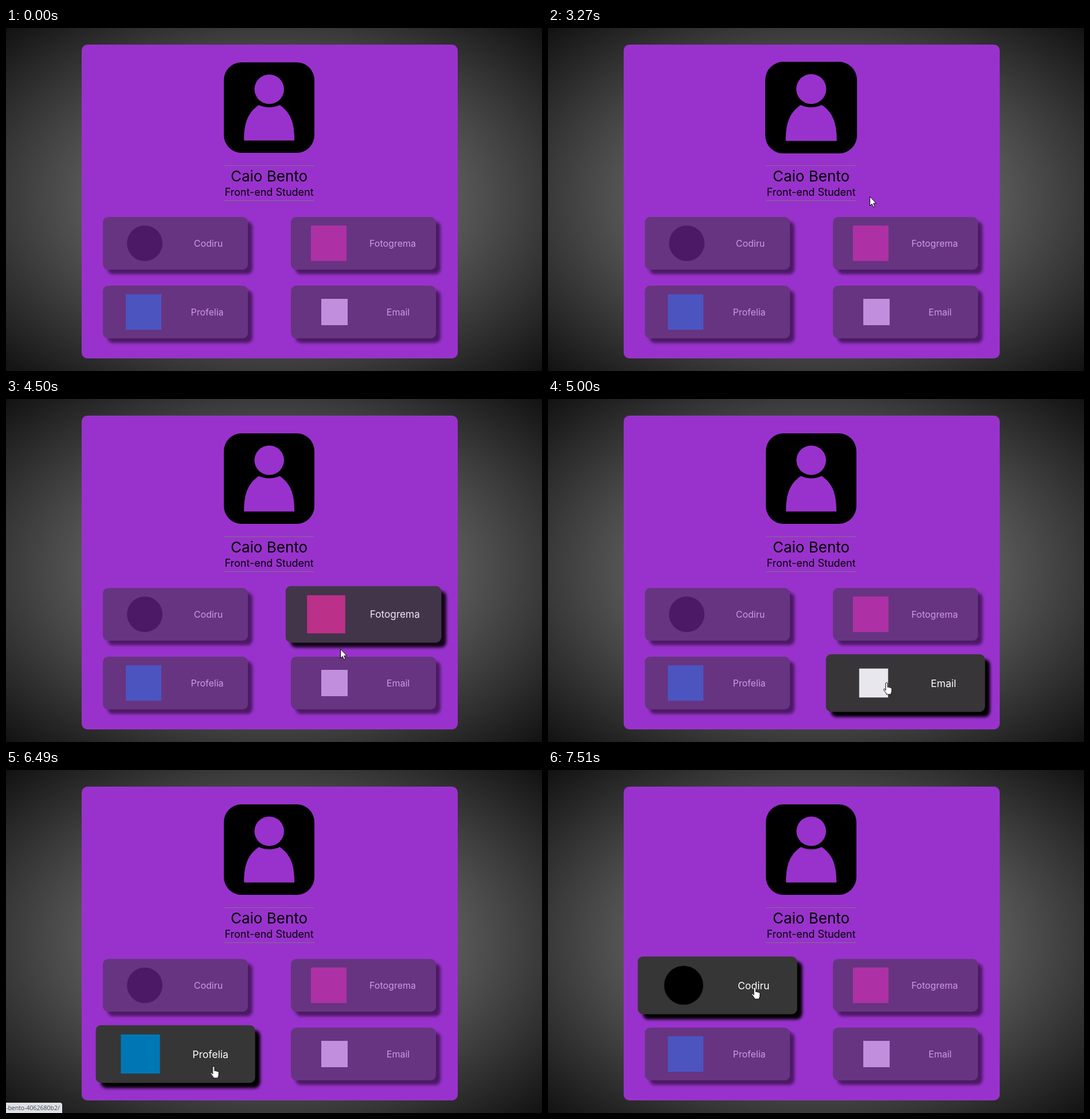
Write an HTML page that moves like this. It is 935 by 599 pixels and loops after 7990 ms.

```html
<!DOCTYPE html>
<html lang="pt">
<head>
<meta charset="utf-8">
<title>Profile card</title>
<style>
  html, body { margin: 0; width: 100%; height: 100%; overflow: hidden; }
  body {
    position: relative;
    background: radial-gradient(#989898, #121212);
    font-family: Inter, "Open Sans", sans-serif;
  }
  body * { position: absolute; box-sizing: border-box; }

  .panel {
    left: 131.5px; top: 28.5px; width: 656px; height: 548px;
    border-radius: 10px; background: #9932cc;
  }

  .hover {
    animation: enter .5s ease var(--on) both, leave .5s ease var(--off) forwards;
    opacity: var(--rest);
  }
  @keyframes enter {
    from { scale: 1; opacity: var(--rest); }
    to { scale: var(--grow); opacity: 1; }
  }
  @keyframes leave {
    from { scale: var(--grow); opacity: 1; }
    to { scale: 1; opacity: var(--rest); }
  }

  .portrait {
    --grow: 1.2; --rest: 1; --on: 1.88s; --off: 2.905s;
    left: 380px; top: 59.5px; width: 158px; height: 158px;
  }

  .title {
    left: 380px; top: 240px; width: 158px; height: 62px;
    border: solid; border-width: 1px 0; border-color: #80728a #a86cc9;
    white-space: nowrap;
  }
  .title span { left: 50%; translate: -50% 0; }
  .name { top: 2px; font-size: 26px; line-height: 32px; }
  .role { top: 34px; font-size: 18px; line-height: 24px; }

  .card {
    --grow: 1.1; --rest: .5;
    left: var(--x); top: var(--y); width: 253px; height: 92px;
    border-radius: 9px; background: #363636; box-shadow: 8px 8px 5px #000;
    color: #fff; font-size: 16px; line-height: 92px;
  }
  .card i {
    left: var(--icon); top: 50%; translate: -50% -50%;
    width: 62px; height: 62px; background: var(--mark);
  }
  .card span { left: var(--label); translate: -50% 0; white-space: nowrap; }

  .code, .work { --x: 169px; }
  .photo, .mail { --x: 497px; }
  .code, .photo { --y: 329.5px; }
  .work, .mail { --y: 449.5px; }

  .code { --on: 6.985s; --off: 9s; --icon: 73px; --label: 184px; --mark: #000; }
  .code i { border-radius: 50%; }
  .photo { --on: 3.44s; --off: 4.41s; --icon: 66px; --label: 177.5px; --mark: #c1307f; }
  .work { --on: 5.88s; --off: 6.92s; --icon: 71px; --label: 182px; --mark: #0077b5; }
  .mail { --on: 4.59s; --off: 5.52s; --icon: 76px; --label: 187px; --mark: #e8eaed; }
  .mail i { width: 46px; height: 46px; }

  .status {
    left: 0; top: 581px; width: 98px; height: 18px;
    border-radius: 0 4px 0 0; background: #dee1e6; color: #45484c;
    font: 10.5px/19px "Open Sans", "Noto Sans", sans-serif;
    white-space: nowrap; overflow: hidden;
    animation: show .12s 6s both, hide .2s 7.17s forwards;
  }
  @keyframes show { from { opacity: 0; } to { opacity: 1; } }
  @keyframes hide { from { opacity: 1; } to { opacity: 0; } }

  .cursor {
    left: 0; top: 0; width: 24px; height: 24px; overflow: visible;
    fill: #fff; stroke: #000; stroke-linejoin: round;
    animation: wander 7.99s linear both;
  }
  .cursor .hand, .cursor.link .arrow { display: none; }
  .cursor.link .hand { display: inline; }
  @keyframes wander {
    0%, 6.2% { translate: 62px 201px; visibility: hidden; }
    14%, 18% { translate: 394px 219px; visibility: visible; }
    23.4% { translate: 378px 177px; }
    30% { translate: 470px 150px; }
    39%, 40.7% { translate: 561px 294px; }
    56.3% { translate: 583px 436px; }
    62.6% { translate: 590px 495px; }
    72% { translate: 435px 517px; }
    81.4% { translate: 361px 517px; }
    86% { translate: 365px 460px; }
    93.8%, 100% { translate: 360px 379px; visibility: visible; }
  }
</style>
</head>
<body>
  <div class="panel"></div>

  <svg class="portrait hover" viewBox="380 59.5 158 158">
    <rect x="380" y="59.5" width="158" height="158" rx="31"/>
    <g fill="#9932cc">
      <circle cx="459.2" cy="106.5" r="25.8"/>
      <path d="M415.2 196C415.2 165 422 147 441 134Q459.2 142 477.5 134C496.500 147 503.2 165 503.2 196Z"/>
    </g>
  </svg>

  <div class="title">
    <span class="name">Caio Bento</span>
    <span class="role">Front-end Student</span>
  </div>

  <div class="card hover code"><i></i><span>Codiru</span></div>
  <div class="card hover photo"><i></i><span>Fotogrema</span></div>
  <div class="card hover work"><i></i><span>Profelia</span></div>
  <div class="card hover mail"><i></i><span>Email</span></div>

  <div class="status">-bento-4062680b2/</div>

  <svg class="cursor">
    <path class="arrow" d="M.5 .5V16.5L4 13.2 6.5 18.8 9 17.7 6.6 12.2H11.5Z"/>
    <path class="hand" transform="translate(-5 0)" d="M4 14V2.2a1.7 1.7 0 0 1 3.4 0V8.5a1.5 1.5 0 0 1 2.6 .6a1.5 1.5 0 0 1 2.5 .8a1.4 1.4 0 0 1 2.3 1.2V15c0 2-1.5 3.5-1.5 6H5.5C5.5 19 2.5 16 .7 13.2c-.7-1.4 1-2.4 2-1.4z"/>
  </svg>

<script>
  const LOOP = 7990, STEP = 125, LEAD = 15;

  const cursor = document.querySelector('.cursor');
  const motions = document.getAnimations();
  motions.forEach(m => m.pause());

  // The pointer is a hand from the moment a card is entered until it is left
  const links = [...document.querySelectorAll('.card')].map(card => {
    const style = getComputedStyle(card);
    return ['--on', '--off'].map(key => parseFloat(style.getPropertyValue(key)) * 1000);
  });

  const start = performance.now();

  // Show the motion at eight pictures a second
  function draw() {
    const now = (performance.now() - start) % LOOP;
    const t = Math.min(Math.floor((now + LEAD) / STEP) * STEP, LOOP - 1);
    motions.forEach(m => { m.currentTime = t; });
    cursor.classList.toggle('link', links.some(([on, off]) => t >= on && t < off));
    requestAnimationFrame(draw);
  }
  draw();
</script>
</body>
</html>
```
